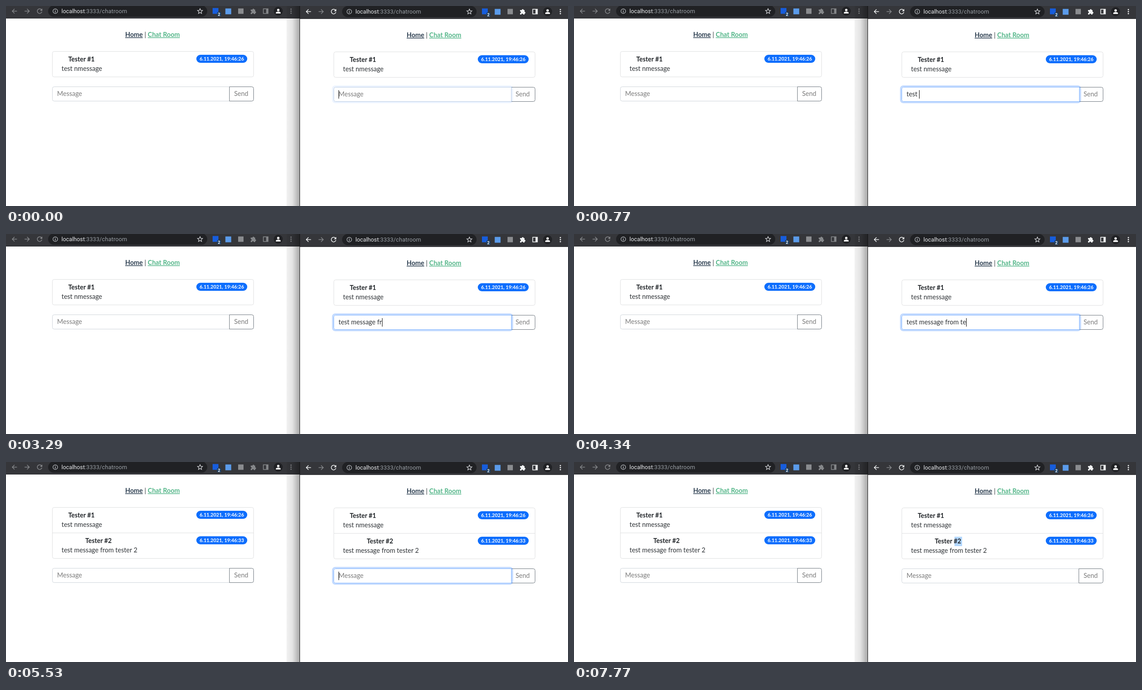
An HTML page that plays this animation: 1254x447 px, repeating every 8000 ms.

```html
<!DOCTYPE html>
<html lang="en">
<head>
<meta charset="utf-8">
<title>Chat room</title>
<style>
  html, body { margin: 0; width: 100%; height: 100%; overflow: hidden; background: #fff; }
  svg { display: block; width: 1254px; height: 447px; }
  text { font: 14.5px Lato, sans-serif; fill: #2f3337; }
  .name { font-weight: 700; font-size: 14.3px; fill: #212529; }
  .time { font-weight: 700; font-size: 11px; fill: #fff; text-anchor: middle; }
  .home, .room { font-weight: 700; text-decoration: underline; text-decoration-thickness: 1px; }
  .home { fill: #2c3e50; }
  .room { fill: #54b689; }
  .hint { fill: #7b7b7b; }
  .url { font: 12.75px Roboto, sans-serif; fill: #e8eaed; }
  .path { fill: #9aa0a6; letter-spacing: .2px; }
  .count { font: 700 9px Roboto, sans-serif; fill: #fff; text-anchor: middle; }
</style>
</head>
<body>
<svg viewBox="0 0 1254 447">
  <defs>
    <linearGradient id="shade">
      <stop offset="0" stop-opacity=".05"/>
      <stop offset=".45" stop-opacity=".11"/>
      <stop offset="1" stop-opacity=".34"/>
    </linearGradient>
  </defs>
  <g id="left"></g>
  <g id="right" transform="translate(628 1)"></g>
  <g id="bars"></g>
  <rect x="626" width="29" height="447" fill="url(#shade)"/>
  <rect x="655" width="1" height="447" fill="#111"/>
</svg>
<script>
const LOOP = 8000, STEP = 70;
const DRAFT = 'test message from tester 2';
// moment at which each character of the draft appears
const KEYS = [280, 420, 490, 630, 770, 980, 1400, 1680, 1820, 1960, 2240, 2450, 2730,
  3010, 3290, 3640, 3780, 3920, 4200, 4340, 4480, 4620, 4760, 4900, 5040, 5180];
const SENT = 5530, BLUR = 7630, SELECT = 7770;
const BLINKS = [5740, 6230, 6790, 7350];

const $ = id => document.getElementById(id);
const text = (x, y, str, cls = '') =>
  `<text x="${x}" y="${y}" class="${cls}">${str.replace(/ /g, '\u00a0')}</text>`;
const rect = (x, y, w, h, attrs) =>
  `<rect x="${x}" y="${y}" width="${w}" height="${h}" ${attrs}/>`;
const at = (x, y, body) => `<g transform="translate(${x} ${y})">${body}</g>`;

const pen = document.createElement('canvas').getContext('2d');
const widthOf = str => {
  pen.font = '14.5px Lato, sans-serif';
  return pen.measureText(str).width;
};

// Browser toolbar; nav and tools are the offsets of its two icon groups
function toolbar(nav, tools, y, end, active) {
  const on = active ? '#f1f3f4' : '#85878a', off = '#85878a';
  const line = (color, d) => `<path d="${d}" fill="none" stroke="${color}" stroke-width="1.5"/>`;
  const arrow = 'M5.5 0H-5M0-5L-5 0L0 5';
  const star = Array.from({ length: 10 }, (_, i) => {
    const r = i % 2 ? 2.7 : 6, a = i * Math.PI / 5;
    return `${r * Math.sin(a)},${-r * Math.cos(a)}`;
  }).join(' ');
  const dots = [-4.5, 0, 4.5].map(d => `<circle cy="${d}" r="1.5" fill="${on}"/>`).join('');
  const puzzle = `<path d="M-6-3H-2A2 2 0 1 1 2-3H4V1A2 2 0 1 1 4 5V7H1A2 2 0 0 0 -3 7H-6V4A2 2 0 0 0 -6 0Z" fill="${on}"/>`;
  const panel = rect(-5.2, -5.2, 10.4, 10.4, `fill="none" stroke="${on}" stroke-width="1.6"`) +
    rect(1, -5, 4.5, 10, `fill="${on}"`);
  const person = '<circle r="10" fill="#202124"/><circle cy="-2.6" r="2.7" fill="#fff"/>' +
    '<path d="M-5.3 5.2V3.6C-5.3 0 5.3 0 5.3 3.6V5.2Z" fill="#fff"/>';
  const info = line('#bdc1c6', 'M0-.8V3M0-3V-1.7') +
    '<circle r="5.2" fill="none" stroke="#bdc1c6" stroke-width="1.2"/>';
  const badge = rect(-7, -7, 13, 13, 'fill="#175ddc"') +
    rect(3, 2, 9, 9.5, 'rx="1.5" fill="#1d3f63"') + text(7.3, 10, '2', 'count');
  return rect(nav, -2, end - nav, 30 + y, 'fill="#35363a"') +
    at(nav, 11.5 + y,
      at(19, 0, line(on, arrow)) +
      at(47, 0, `<g transform="scale(-1 1)">${line(off, arrow)}</g>`) +
      at(75, 0, line(on, 'M4.2-3.2A5.2 5.2 0 1 0 5.1 1.2') + `<path d="M6-6V-.8H.8Z" fill="${on}"/>`) +
      rect(94, -12.5, tools + 449 - nav - 94, 25, 'rx="12.5" fill="#202124"') +
      at(110, 0, info) +
      '<text x="123.7" y="4.5" class="url">localhost<tspan class="path">:3333/chatroom</tspan></text>') +
    at(tools, 11.5 + y,
      at(433, .3, `<polygon points="${star}" fill="none" stroke="#dadce0" stroke-width="1.2"/>`) +
      at(468, 0, badge) +
      rect(489.5, -6, 13, 13, 'fill="#5b9bea"') +
      rect(518, -6, 12, 12, 'fill="#8a8c8f"') +
      at(552, -.5, puzzle) + at(579.5, 0, panel) + at(607.5, 0, person) + at(636, 0, dots));
}

function message(y, x, name, time, body, selected) {
  return (selected ? rect(221, y + 8, 17, 21, 'fill="#b3d7ff"') : '') +
    text(x, y + 22.5, name, 'name') + text(124, y + 44, body) +
    rect(424.7, y + 8, 113.6, 18, 'rx="9" fill="#0d6efd"') +
    text(481.5, y + 20.7, time, 'time');
}

function page({ sent, draft = '', focus = 0, caret, selected }) {
  const shift = sent ? 57 : 0, y = 180 + shift;
  const card = rect(103.5, 101.5, 449, 57 + shift, 'rx="4" fill="#fff" stroke="#dedfe0"') +
    (sent ? rect(104, 158, 448, 1, 'fill="#dedfe0"') : '');
  const button = `<path d="M498.5 ${y + .5}h50q4 0 4 4v24q0 4-4 4h-50z" fill="#fff" stroke="#6c757d"/>`;
  const mix = (a, b) => Math.round(a + (b - a) * focus);
  const border = `rgb(${mix(206, 134)},${mix(212, 183)},${mix(218, 254)})`;
  const w = focus ? 396 : 395;
  const ring = rect(101.25, y - 1.75, w + 4.5, 36.25,
    `rx="5.5" fill="none" stroke="#0d6efd" stroke-width="3.5" stroke-opacity="${.25 * focus}"`);
  const input = (focus ? ring : '') +
    `<path d="M${103.5 + w} ${y + .5}v32H107.5q-4 0-4-4v-24q0-4 4-4z" fill="#fff" stroke="${border}"/>`;
  return text(266, 69, 'Home', 'home') + text(309, 69, '|') + text(316.3, 69, 'Chat Room', 'room') +
    card + message(101, 139, 'Tester #1', '6.11.2021, 19:46:26', 'test nmessage') +
    (sent ? message(158, 177, 'Tester #2', '6.11.2021, 19:46:33', DRAFT, selected) : '') +
    (focus ? button + input : input + button) +
    text(509, y + 21, 'Send', 'hint') +
    (draft ? text(114, y + 21, draft) : text(114, y + 21, 'Message', 'hint')) +
    (caret ? rect(114 + Math.round(widthOf(draft)), y + 7, 1, 19, 'fill="#000"') : '');
}

function focusAt(t) {
  if (t >= BLUR) return Math.max(0, .7 - (t - BLUR) / STEP * .35);
  return Math.min(1, .3 + t / STEP * .25);
}

let shown = '';
function draw(now) {
  const t = Math.floor(now % LOOP / STEP) * STEP;
  const sent = t >= SENT;
  const state = {
    sent,
    draft: sent ? '' : DRAFT.slice(0, KEYS.filter(k => k <= t).length),
    focus: focusAt(t),
    caret: t < BLUR && BLINKS.filter(b => b <= t).length % 2 === 0,
    selected: t >= SELECT
  };
  const key = JSON.stringify(state);
  if (key !== shown) {
    shown = key;
    $('left').innerHTML = page({ sent });
    $('right').innerHTML = page(state);
  }
  requestAnimationFrame(draw);
}

$('bars').innerHTML = toolbar(0, 0, 0, 655, false) + toolbar(656, 601, 1, 1254, true);
draw(performance.now());
</script>
</body>
</html>
```
